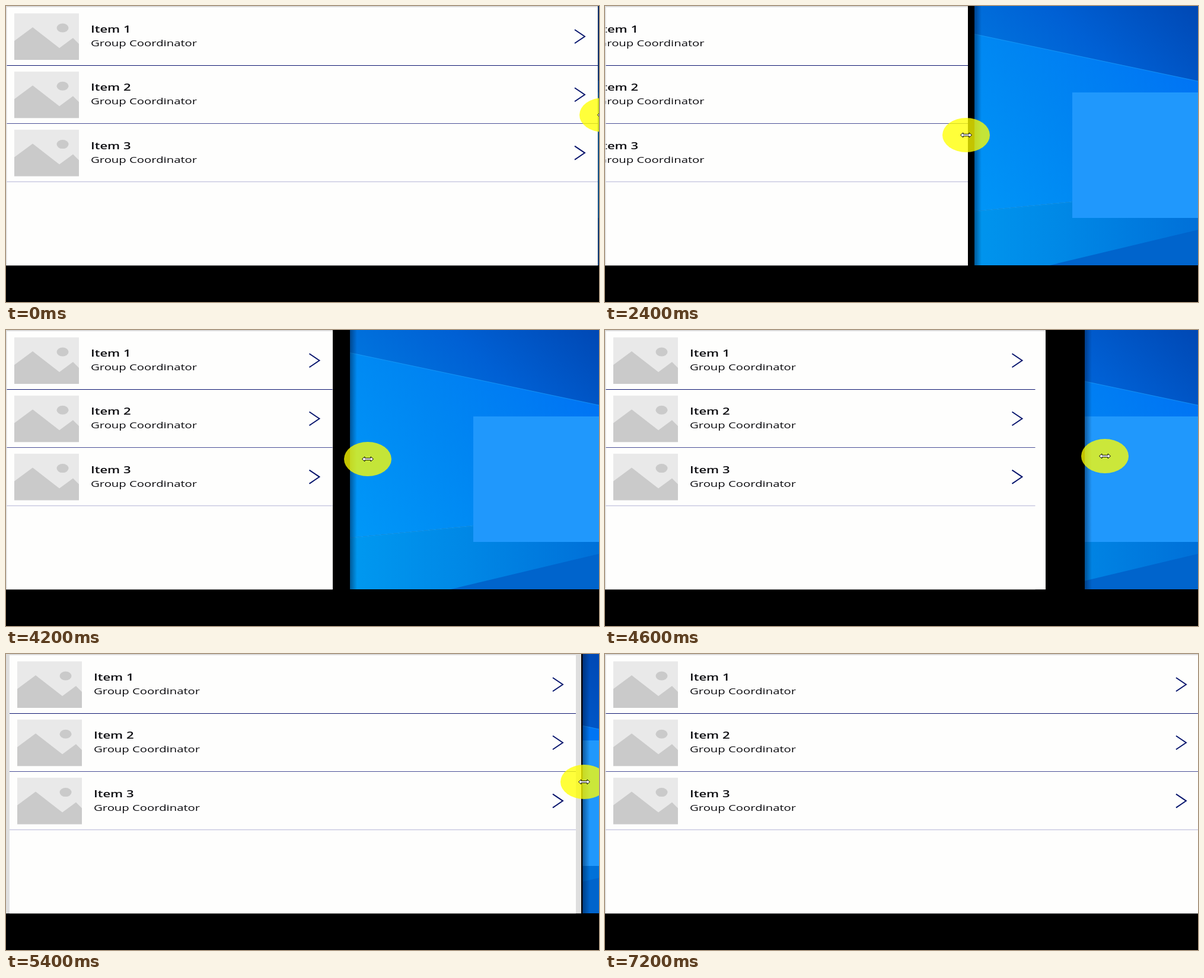
These frames come from a looping animation (1000x500 px, 8200 ms). An HTML page:

```html
<!DOCTYPE html>
<html lang="en">
<head>
<meta charset="utf-8">
<title>Resizing list</title>
<style>
  html, body { margin: 0; width: 100%; height: 100%; overflow: hidden; background: #000; }
  #stage { display: block; width: 100%; height: 100%; }
  text { font-family: "Open Sans", sans-serif; fill: #0c0c10; }
  .title { font-size: 16px; font-weight: 600; }
  .owner { font-size: 14.7px; }
</style>
</head>
<body>
<svg id="stage" viewBox="0 0 1000 500" preserveAspectRatio="none">
  <defs>
    <linearGradient id="sky" x1="0" y1="0.3" x2="1" y2="0">
      <stop offset="0" stop-color="#0078e0"/>
      <stop offset="0.5" stop-color="#0060d4"/>
      <stop offset="1" stop-color="#0048b4"/>
    </linearGradient>
    <linearGradient id="beam" x1="0" y1="0.8" x2="1" y2="0.3">
      <stop offset="0" stop-color="#0098f8"/>
      <stop offset="0.5" stop-color="#0086f2"/>
      <stop offset="1" stop-color="#0074f4"/>
    </linearGradient>
    <linearGradient id="floor">
      <stop offset="0" stop-color="#009cf2"/>
      <stop offset="0.5" stop-color="#0088e6"/>
      <stop offset="1" stop-color="#0070d8"/>
    </linearGradient>
    <linearGradient id="shade">
      <stop offset="0" stop-color="#001c40" stop-opacity="0.5"/>
      <stop offset="1" stop-color="#001c40" stop-opacity="0"/>
    </linearGradient>
    <g id="thumb">
      <path d="M14 12.5H123V91H14Z" fill="#e9e9e9"/>
      <path d="M14 59L45 36L90 71L113 54L123 64V91H14Z" fill="#cacaca"/>
      <ellipse cx="95.5" cy="37" rx="10" ry="7.5" fill="#cacaca"/>
    </g>
  </defs>

  <g id="desktop">
    <path d="M540 0H1000V130H540Z" fill="url(#sky)"/>
    <path d="M540 30L1000 127V310L540 355Z" fill="url(#beam)"/>
    <path d="M540 355L1000 310V438H540Z" fill="url(#floor)"/>
    <path d="M750 438L1000 378V438Z" fill="#0064cc"/>
    <path d="M540 30L1000 127M540 355L1000 310" stroke="#24a8ff" stroke-opacity="0.6" fill="none"/>
    <rect x="788" y="146" width="212" height="212" fill="#2098fc"/>
  </g>
  <rect id="shadow" width="12" height="438" fill="url(#shade)"/>
  <rect id="frame" height="500" fill="#000"/>

  <svg id="content" height="438.5">
    <rect id="gutter" width="1010" height="439" fill="#dfdfdf"/>
    <g id="page">
      <rect id="paper" x="1" y="2" height="437" fill="#fefefd"/>
      <g id="rows"></g>
    </g>
    <path d="M0 1H1010M0.5 0V439" stroke="#dcdcdc" stroke-width="2" fill="none"/>
  </svg>
  <rect y="438.5" width="1000" height="62" fill="#000"/>

  <g id="pointer">
    <ellipse rx="40" ry="29" fill="#ff0" fill-opacity="0.77"/>
    <g fill="#fff" stroke="#000">
      <path id="resizer" d="M-9.5 0L-5 -4V-1.5H5V-4L9.5 0L5 4V1.5H-5V4Z"/>
      <path id="arrow" d="M0 0V15L5 12L9 18L12 17L9 11H15Z"/>
    </g>
  </g>
</svg>

<script>
const LOOP = 8200, STEP = 200, PITCH = 98.3;
const el = id => document.getElementById(id);
const set = (node, attrs) => {
  for (const name in attrs) node.setAttribute(name, attrs[name]);
};

el("rows").innerHTML = ["#0c1470", "#4a4f96", "#cfcfe4"].map((color, i) => `
  <g transform="translate(0 ${i * PITCH})">
    <use href="#thumb"/>
    <g transform="translate(143 0) scale(1.38 1)">
      <text class="title" y="45">Item ${i + 1}</text>
      <text class="owner" y="68">Group Coordinator</text>
    </g>
    <path class="chevron" d="M-17 40L0 51.5L-17 63" fill="none" stroke="#00126b" stroke-width="1.9"/>
    <rect class="rule" x="1" y="${100 - i * 0.3}" height="${i < 2 ? 1 : 1.6}" fill="${color}"/>
  </g>`).join("");

// Pointer position by time: [ms, x, y]
const pointerKeys = [
  [0, 1007, 184], [400, 1007, 184], [1000, 998, 187], [1400, 998, 187],
  [1600, 950, 191], [1800, 871, 201], [2400, 609, 218], [2600, 584, 220],
  [3000, 552, 221], [4000, 552, 221], [4200, 610, 218], [4600, 843, 213],
  [5200, 952, 215], [5400, 975, 216], [6200, 1002, 221], [6400, 1002, 221],
  [6600, 790, 190], [7000, 232, 107], [7200, -60, 80], [LOOP, -60, 80]
];

// Window by time: [ms, page offset, page width, content edge, desktop edge]
const windowKeys = [
  [0, 0, 998, 998, 998.5], [1400, 0, 998, 998, 998.5], [1600, 0, 998, 965, 972],
  [1800, 0, 998, 877, 891], [2400, -154.5, 998, 612, 623], [2800, -205, 998, 560, 564],
  [3000, 0, 550.5, 550.5, 551.5], [4000, 0, 550.5, 550.5, 551.5],
  [4200, 0, 550.5, 551, 580], [4600, 0, 725.5, 743, 809], [5200, 0, 915, 930, 945],
  [5400, 5, 956, 970, 972.5], [5800, 0, 990, 990, 991], [6200, 0, 1002, 1002, 1002],
  [LOOP, 0, 1002, 1002, 1002]
];

function sample(keys, time) {
  const next = keys.findIndex(key => key[0] > time);
  const a = keys[next - 1], b = keys[next];
  const part = (time - a[0]) / (b[0] - a[0]);
  return a.slice(1).map((value, i) => value + (b[i + 1] - value) * part);
}

const chevrons = document.querySelectorAll(".chevron");
const rules = document.querySelectorAll(".rule");

function draw(now) {
  const time = Math.floor(now % LOOP / STEP) * STEP;
  const [x, y] = sample(pointerKeys, time);
  const [offset, width, contentEdge, desktopEdge] = sample(windowKeys, time);

  set(el("frame"), { width: desktopEdge });
  set(el("shadow"), { x: desktopEdge });
  set(el("content"), { width: contentEdge });
  set(el("gutter"), { fill: offset > 0 ? "#dfdfdf" : "#fefefd" });
  set(el("page"), { transform: `translate(${offset} 0)` });
  set(el("paper"), { width: width - 1 });
  chevrons.forEach(node => set(node, { transform: `translate(${width - 22} 0)` }));
  rules.forEach(node => set(node, { width: width - 1 }));

  const roaming = time >= 6600;
  set(el("pointer"), { transform: `translate(${x} ${y})` });
  set(el("resizer"), { visibility: roaming ? "hidden" : "visible" });
  set(el("arrow"), { visibility: roaming ? "visible" : "hidden" });
  requestAnimationFrame(() => draw(performance.now() - start));
}

const start = performance.now();
draw(0);
</script>
</body>
</html>
```
